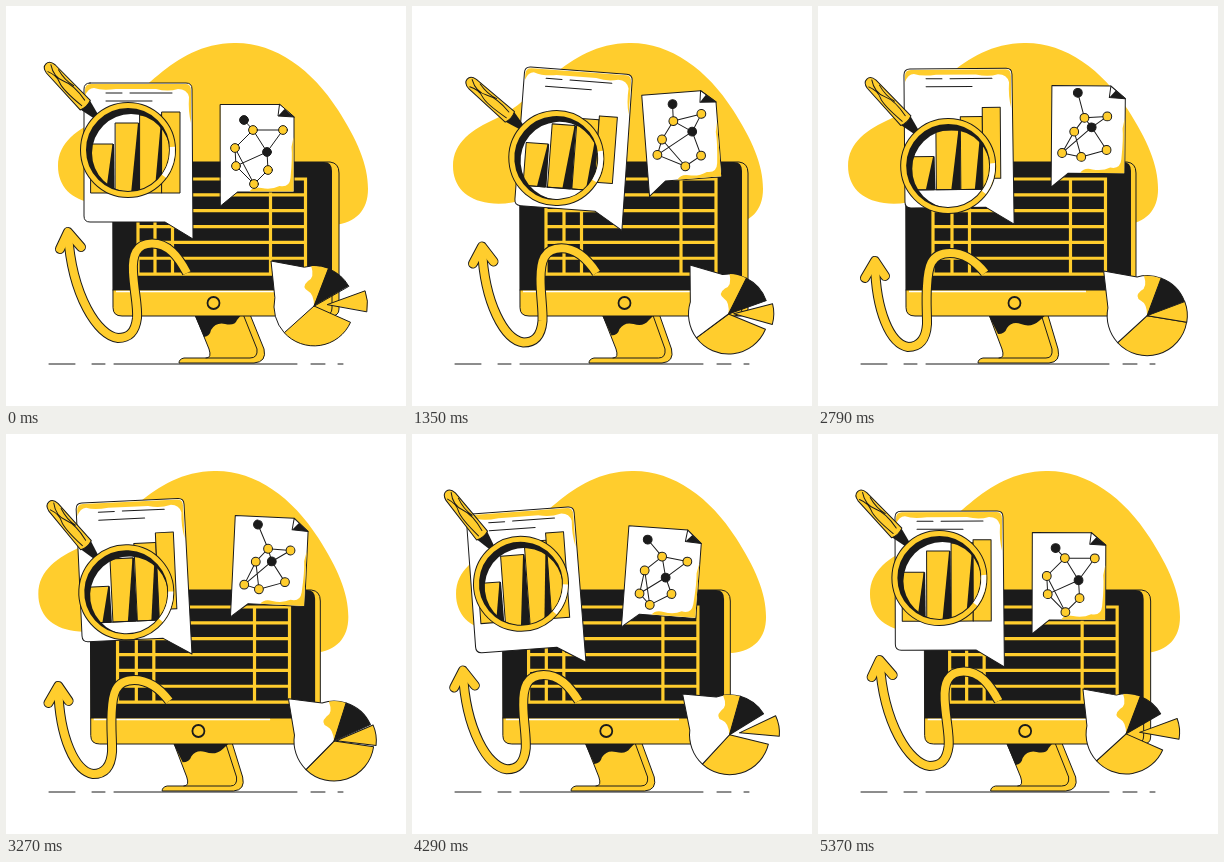
Animation, 400 px wide and 400 px high, one loop 5.4 s. Source, as an HTML page:

```html
<!DOCTYPE html>
<html lang="en">
<head>
<meta charset="utf-8">
<title>Data analysis</title>
<style>
  html, body { margin: 0; width: 100%; height: 100%; overflow: hidden; background: #fff; }
  svg { display: block; width: 100vw; height: 100vh; }
  .y { fill: #ffcd2d; }
  .k { fill: #1b1b1b; }
  .w { fill: #fff; }
  .n { fill: none; }
  .s { stroke: #1b1b1b; stroke-linejoin: round; stroke-linecap: round; }
</style>
</head>
<body>
<svg id="stage" viewBox="0 0 400 400"></svg>
<script>
const LOOP = 5400, STEP = 30, YELLOW = '#ffcd2d', BLACK = '#1b1b1b';
const stage = document.getElementById('stage');

// m swings 0 -> 1 -> 0 over the loop, s is the sine a quarter turn apart.
let m, s;
const sway = (base, k, b) => base + k * m + b * s;
const path = (cls, d, extra = '') => `<path class="${cls}" d="${d}" ${extra}/>`;
const dot = (cls, x, y, r) => `<circle class="${cls}" cx="${x}" cy="${y}" r="${r}"/>`;
const group = (x, y, angle, body) =>
  `<g transform="translate(${x} ${y}) rotate(${angle})">${body}</g>`;
const polar = (r, deg) => {
  const a = deg * Math.PI / 180;
  return `${r * Math.cos(a)} ${r * Math.sin(a)}`;
};

// Blends two path strings with the same commands.
function morph(from, to) {
  const ends = to.match(/-?[\d.]+/g);
  let i = 0;
  return from.replace(/-?[\d.]+/g, v => +v + (ends[i++] - v) * m);
}

function blob() {
  return group(-22 * m, 0, 0, path('y',
    'M228 37C268 36 306 63 332 104C351 134 362 158 362 183C362 204 350 217 328 219L125 193' +
    'C112 197 100 199 88 197C65 194 52 180 52 160C52 136 72 123 94 113C136 95 164 38 228 37Z'));
}

function ground() {
  return path('n s', 'M43 358H69M86 358H99M108 358H291M305 358H319M332 358H337');
}

function stand() {
  const outer = morph(
    'M188 306L203 343Q206 352 200 352L178 352Q173 353 173 357L248 357Q261 356 258 343L243 306Z',
    'M171 306L185 343Q188 352 182 352L166 352Q161 353 161 357L232 357Q244 356 241 343L230 306Z');
  const shade = morph(
    'M188 308L198 331Q204 330 205 324Q210 316 219 318Q229 320 231 314L236 308Z',
    'M171 308L181 328Q188 328 190 322Q195 315 204 318Q214 322 222 315L230 308Z');
  const edge = morph('M237 308L251 343Q252 352 244 352L200 352',
                     'M224 308L235 343Q236 352 229 352L182 352');
  return path('y s', outer) + path('k', shade) + path('n s', edge);
}

function monitor() {
  const left = 107 - 18 * m, right = 333 - 14 * m, face = 326 - 12 * m;
  const cols = [[132, -16], [149, -14], [166.5, -14], [264.5, -11], [299.5, -11]]
    .map(([x, k]) => x + k * m);
  let grid = '';
  for (let i = 0; i < 7; i++) grid += `M${cols[0]} ${173 + i * 15.85}H${cols[4]}`;
  for (const x of cols) grid += `M${x} 173V268`;
  const shell = `M${left} 156H${right - 9}Q${right} 157 ${right} 167V303` +
    `Q${right} 310 ${right - 8} 310H${left + 9}Q${left} 310 ${left} 302Z`;
  return path('y s', shell) +
    path('k', `M${left} 284V164Q${left} 156 ${left + 8} 156H${face - 8}Q${face} 156 ${face} 165V284Z`) +
    path('n s', `M${left} 284H${face}V302Q${face} 309 ${face - 7} 310`) +
    path('n', `M${left + 3} 285.5H${face - 45}`, 'stroke="#fff" stroke-width="1.5"') +
    path('n', grid, `stroke="${YELLOW}" stroke-width="3.2" stroke-linecap="square"`) +
    `<g stroke-width="1.8">${dot('y s', 207.5 - 10 * m, 297, 6)}</g>`;
}

function arrow() {
  const shaft = morph(
    'M181 267C172 250 162 237.5 146 237.5C130 237.5 126 250 127 266C128 285 132 300 131 312C129 328 122 332 112 332C92 330 66 290 62 228',
    'M168 267C157 253 146 247 133 247C113 247 111 262 110 280C109 295 110 305 110 318C109 334 102 341 91 341C73 338 59 305 58 258');
  const head = morph('M54 243L62 226L75 241', 'M48 272L58 255L68 270');
  const layer = (color, w) => `<g fill="none" stroke="${color}" stroke-width="${w}" stroke-linejoin="round">
    <path d="${shaft}"/><path d="${head}" stroke-linecap="round"/></g>`;
  return layer(BLACK, 10) + layer(YELLOW, 8);
}

// Left edge, width, top, and the two swings of the top.
const BARS = [[-47, 22, -9, 27, 1], [-22.5, 23, -30, 22, 4], [2, 22, -38, 17, 7], [24, 18, -41, 11, 9]];

function bars(base, wedges) {
  return BARS.map(([x, w, top, k, b]) => {
    const y = sway(top, k, b), r = x + w;
    return path('y s', `M${x} ${y}H${r}V${base}H${x}Z`) +
      (wedges ? path('k', `M${r - 0.5} ${y}H${r + 1}L${r + 1.5} ${base}H${r - 8}Z`) : '');
  }).join('');
}

const panelPose = () => [sway(132, 11, 24), sway(147, -15, -5), 4.3 * s];

function panel() {
  return group(...panelPose(),
    path('w s', 'M-48 -70H48Q54 -70 54 -64L55 86L27 69H-48Q-54 69 -54 63V-64Q-54 -70 -48 -70Z') +
    path('y', 'M-53 -63Q-53 -69 -47 -69H48Q53 -69 53 -62V-30Q50 -42 51 -56Q49 -64 40 -64Q30 -61 18 -64H-22Q-36 -62 -44 -65Q-50 -65 -53 -57Z') +
    path('n s', 'M-32 -60H-16M-8 -60H34M-32 -52H14') + bars(40, false));
}

function lens() {
  const x = sway(122, 10, 17.3), y = sway(144, 16, 0), tilt = -4.9 * s;
  const base = 46 + 5 * m;
  const handle = group(0, 0, 46.4,
    path('k', 'M-47 -3L-64 -7V7L-47 3Z') +
    path('y s', 'M-62 -7L-112 -6Q-119 -5 -119 0Q-119 5 -112 6L-62 7Q-59 0 -62 -7Z') +
    path('n s', 'M-115 -3Q-104 4 -94 -1T-66 -3M-112 4Q-103 0 -96 3T-64 3M-106 -5Q-94 -2 -84 -5'));
  return `<clipPath id="glass"><circle cx="${x}" cy="${y}" r="42"/></clipPath>
    <g clip-path="url(#glass)">${dot('w', x, y, 42)}` +
    group(...panelPose(), bars(base, true) + path('n s', `M-54 ${base}H50`)) + '</g>' +
    group(x, y, tilt, handle +
      path('k', 'M-42 0A42 42 0 1 1 42 0A42 42 0 1 1 -42 0ZM-36 3A39 39 0 1 0 42 3A39 39 0 1 0 -36 3Z', 'fill-rule="evenodd"') +
      `<circle class="n" r="44.5" stroke="${BLACK}" stroke-width="7"/>
       <circle class="n" r="44.5" stroke="${YELLOW}" stroke-width="5"/>` +
      path('n', `M${polar(44.5, -4)}A44.5 44.5 0 0 1 ${polar(44.5, 36)}`, 'stroke="#fff" stroke-width="5"'));
}

// Start, shift at mid loop, and swing of each node.
const NODES = [
  [-13.5, -27, 3, -8.5, 5, 0], [-4.5, -17, 0, 6.5, -3, -0.5],
  [25.5, -17, -7, 4.5, -1, -4.5], [9.5, 5, -6, -6.5, 4, -4],
  [-22.5, 1, 8, 2.5, -1.7, 1], [-21.5, 19, -5, 5.5, -2, -3.5],
  [-3.5, 37, -3, -8.5, 6, -1], [10.5, 23, 8, -1.5, 3, 0]
];
const DARK = [0, 3];
const LINKS = ['01', '12', '13', '23', '14', '45', '53', '56', '46', '67', '37'];

function note() {
  const pts = NODES.map(([x, y, kx, ky, bx, by]) => [sway(x, kx, bx), sway(y, ky, by)]);
  const links = LINKS.map(([a, b]) => `M${pts[a]}L${pts[b]}`).join('');
  return group(sway(251.5, 20, 8.4), sway(141, -19, -2.8), -4.4 * s,
    path('w s', 'M-37 -42.5H22L36.5 -30V45H-20L-37 59Z') +
    path('y', 'M-8 44.5Q-4 39 4 41Q14 43 22 39Q32 41 33 31Q35 10 34 0L36 -10V44.5Z') +
    path('w s', 'M22 -42.5L20.5 -31L36.5 -30Z') +
    path('k', 'M20.5 -31L27 -38L36.5 -30Z') +
    path('n s', links) +
    pts.map(([x, y], i) => dot(DARK.includes(i) ? 'k s' : 'y s', x, y, 4.4)).join(''));
}

function pie() {
  const open = 1 - m, R = 40;
  const arc = (a, b) => `${polar(R, a)}A${R} ${R} 0 0 1 ${polar(R, b)}`;
  const sector = (cls, a, b) => path(cls + ' s', `M0 0L${arc(a, b)}Z`);
  return group(sway(308, 21, -2), sway(300, 10, 3), 5.5 * s,
    sector('y', 10 + 14 * open, 138) +
    path('w s', `M0 0L${arc(138, 192)}L-43 -45L${arc(256, 291)}Z`) +
    path('y', `M${arc(266, 291)}L0 0Q0 -12 -6 -15Q-13 -19 -6 -25Q1 -28 ${polar(R, 266)}Z`) +
    sector('k', -69, -20 - 10 * open) +
    group(13.5 * open - 1.5 * s, -1.5 * open, 0, sector('y', -20, 10)));
}

function draw(now) {
  const t = Math.floor(now % LOOP / STEP) * STEP;
  const angle = t / LOOP * 2 * Math.PI;
  m = (1 - Math.cos(angle)) / 2;
  s = Math.sin(angle);
  stage.innerHTML = blob() + ground() +
    group(10 * s, 0, 0, stand() + monitor() + arrow()) +
    panel() + lens() + note() + pie();
}

const start = performance.now();
function tick() {
  draw(performance.now() - start);
  requestAnimationFrame(tick);
}
tick();
</script>
</body>
</html>
```
